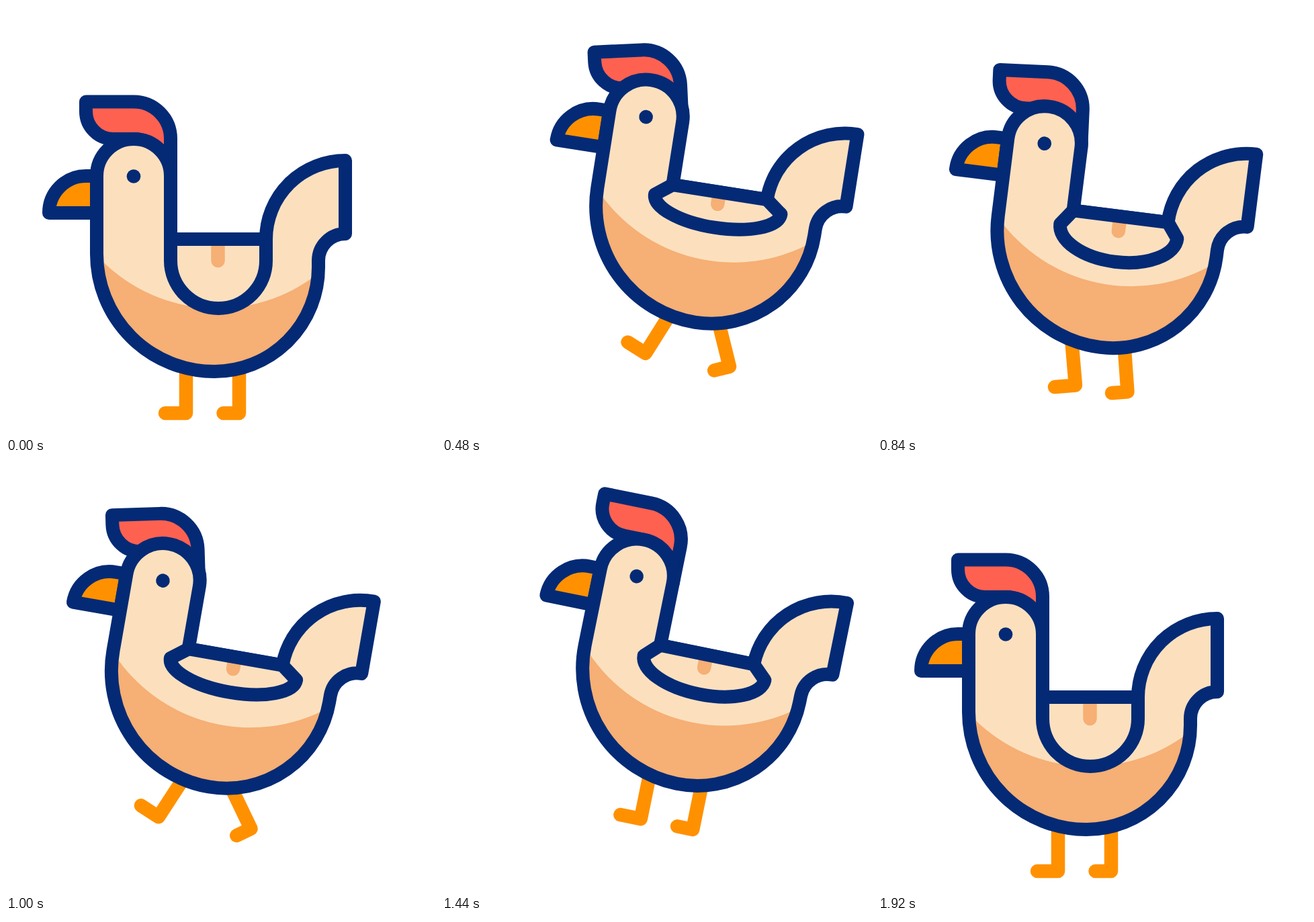
Write an HTML page that moves like this. It is 640x640 px and loops after 2 s.

```html
<!DOCTYPE html>
<html lang="en">
<head>
<meta charset="utf-8">
<title>Walking hen</title>
<style>
html, body { margin: 0; width: 100%; height: 100%; overflow: hidden; background: #fff; }
svg { display: block; width: 100%; height: 100%; }
.line { stroke: #042a75; stroke-width: 20; stroke-linejoin: round; }
.leg { fill: none; stroke: #ff9100; stroke-width: 20.5; stroke-linecap: round; stroke-linejoin: round; }
</style>
</head>
<body>
<svg viewBox="0 0 640 640">
  <defs>
    <path id="body" d="M135 253A55 55 0 0 1 245 253V347H387A118 117 0 0 1 505 230V339A40 40 0 0 0 465 379V389A155 155 0 0 1 310 544A175 175 0 0 1 135 369Z"/>
  </defs>
  <g id="hen">
    <path id="legL" class="leg" d="M268 545V606H237"/>
    <path id="legR" class="leg" d="M347 545V606H323.5"/>
    <path class="line" fill="#ff9100" d="M135 308H64A55 55 0 0 1 119 253H135Z"/>
    <path id="comb" class="line" fill="#ff6150" d="M119 142.5H190A55 55 0 0 1 245 197.5V253A55 55 0 0 0 190 198H160A41 41 0 0 1 119 157Z"/>
    <use href="#body" fill="#fce0be"/>
    <path fill="#f6af74" d="M135 371A243 243 0 0 0 464.7 398A155 155 0 0 1 310 544A175 175 0 0 1 135 371Z"/>
    <use href="#body" class="line" fill="none"/>
    <path id="wing" fill="#fce0be"/>
    <path id="mark" fill="none" stroke="#f6af74" stroke-width="20.5" stroke-linecap="round"/>
    <path id="edge" class="line" fill="none"/>
    <circle cx="190" cy="253.5" r="10.3" fill="#042a75"/>
  </g>
</svg>
<script>
const FRAME = 40, LOOP = 2000, END = 1920;
const $ = id => document.getElementById(id);
const turn = (id, angle, cx, cy) => $(id).setAttribute("transform", `rotate(${angle} ${cx} ${cy})`);

function draw(t) {
  // Eased step from 0 to 1, and a bump that rises and falls again.
  const ease = (a, b) => {
    const u = Math.min(1, Math.max(0, (t - a) / (b - a)));
    return u * u * (3 - 2 * u);
  };
  const bump = (a, peak, b) => ease(a, peak) - ease(peak, b);

  // Two hops with a short landing between them, then back to rest.
  const dx = 101 * ease(105, 560) - 80.7 * ease(520, 1000) + 56 * ease(1000, 1450) - 76.3 * ease(1390, 1760);
  const dy = -76 * ease(60, 540) + 52 * ease(520, 715) - 52.4 * ease(700, 1150) + 76.4 * ease(1350, 1758);
  const tilt = 9 * ease(0, 500) - 3.2 * ease(500, 680) + 6.1 * ease(680, 1200) - 11.9 * ease(1390, 1850);
  $("hen").setAttribute("transform", `translate(${dx} ${dy}) rotate(${tilt} 300 379)`);

  const hop1 = bump(0, 500, 720), land = bump(500, 720, 1000), hop2 = bump(720, 1000, 1400);
  turn("comb", -11.7 * (hop1 + bump(720, 1000, 1440)), 245, 255);
  turn("legL", 23.3 * (hop1 + hop2) - 35 * land, 268, 545);
  turn("legR", -23 * hop1 - 35.5 * hop2 + 4.5 * land, 347, 545);

  // The raised wing gets wider and flatter.
  const lift = ease(0, 500) - ease(1600, 1920) - .45 * bump(500, 740, 1000) - .26 * bump(1000, 1290, 1600);
  const wide = 24 * lift, side = 379 - 14 * lift;
  const d = `M245 347L${245 - wide} ${side}A${71 + wide} ${71 - 36 * lift} 0 0 0 ${387 + wide} ${side}L387 347Z`;
  $("wing").setAttribute("d", d);
  $("edge").setAttribute("d", d);
  $("mark").setAttribute("d", `M315.5 350V${side}`);
}

const start = performance.now();
function tick() {
  const t = (performance.now() - start) % LOOP;
  draw(Math.min(END, Math.floor(t / FRAME) * FRAME));
  requestAnimationFrame(tick);
}
tick();
</script>
</body>
</html>
```
